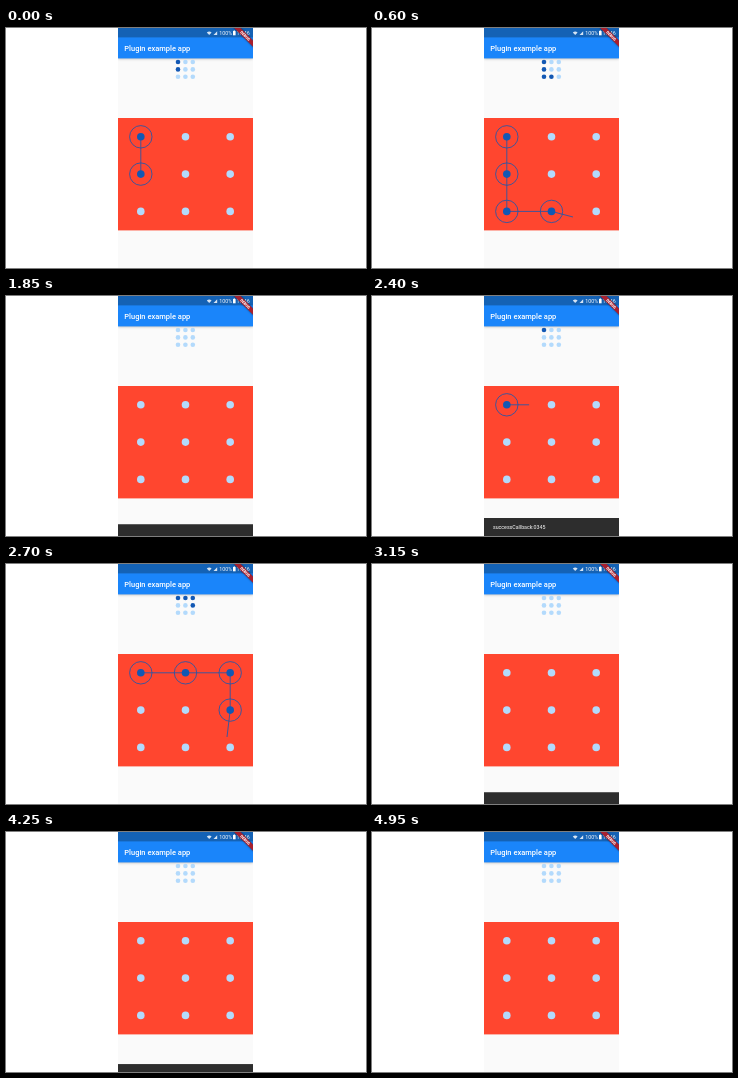
An HTML page with a canvas for the animation above (5000 ms loop, 360x240 px).

```html
<!DOCTYPE html>
<html lang="en">
<head>
<meta charset="utf-8">
<title>Pattern lock</title>
<style>
html, body { margin: 0; width: 100%; height: 100%; overflow: hidden; background: #fff; }
canvas { display: block; width: 360px; height: 240px; }
</style>
</head>
<body>
<canvas id="stage" width="360" height="240"></canvas>
<script>
const ctx = document.getElementById('stage').getContext('2d');
const LOOP = 5000, STEP = 50;
const LEFT = 112, WIDTH = 135, RIGHT = LEFT + WIDTH;
const BAR_HEIGHT = 18, BAR_TIME = 107;
const IDLE = '#b3dafc', ACTIVE = '#1258b4';

const nodeAt = i => [134.8 + (i % 3) * 44.7, 108.8 + Math.floor(i / 3) * 37.3];
const miniAt = i => [172 + (i % 3) * 7.4, 34 + Math.floor(i / 3) * 7.4];

// Keys are [time, node] or [time, x, y]; the finger glides between them.
// Lifting it clears the pattern and shows a snack bar until `hide`.
const strokes = [
  { lift: 655, hide: 1261,
    keys: [[-150, 0], [0, 3], [240, 6], [470, 7], [600, 201, 189], [650, 8]] },
  { lift: 1805, hide: 2405,
    keys: [[1550, 0], [1630, 3], [1710, 4], [1790, 5]] },
  { lift: 3105, hide: 3711,
    keys: [[2350, 0], [2450, 1], [2540, 2], [2630, 5], [2700, 221, 173],
           [2750, 8], [2870, 7], [3000, 6]] },
  { lift: 4215, hide: 4840,
    keys: [[3760, 0], [3830, 3], [3885, 4], [3900, 187, 147], [4010, 5], [4140, 8]] }
];

const isNode = k => k.length === 2;
const keyPoint = k => isNode(k) ? nodeAt(k[1]) : [k[1], k[2]];
const clamp = v => Math.max(0, Math.min(1, v));

// cubic-bezier(.4, 0, .2, 1)
function ease(x) {
  let lo = 0, hi = 1;
  for (let i = 0; i < 20; i++) {
    const s = (lo + hi) / 2;
    const bx = 1.2 * s * (1 - s) ** 2 + 0.6 * s * s * (1 - s) + s ** 3;
    if (bx < x) lo = s; else hi = s;
  }
  return lo * lo * (3 - 2 * lo);
}

function rect(x, y, w, h, fill) {
  ctx.fillStyle = fill;
  ctx.fillRect(x, y, w, h);
}

function dot([x, y], r, fill) {
  ctx.fillStyle = fill;
  ctx.beginPath();
  ctx.arc(x, y, r, 0, Math.PI * 2);
  ctx.fill();
}

function label(text, x, y, font, align = 'left') {
  ctx.font = font + ' Roboto, sans-serif';
  ctx.textAlign = align;
  ctx.fillStyle = '#fff';
  ctx.fillText(text, x, y);
}

function gesture(t) {
  const stroke = strokes.find(s => t >= s.keys[0][0] && t < s.lift);
  if (!stroke) return { picked: [], finger: null };
  const { keys } = stroke;
  const past = keys.filter(k => k[0] <= t);
  const a = past[past.length - 1], b = keys[past.length] || a;
  const p = keyPoint(a), q = keyPoint(b);
  const u = a === b ? 0 : (t - a[0]) / (b[0] - a[0]);
  return {
    picked: past.filter(isNode).map(k => k[1]),
    finger: [p[0] + (q[0] - p[0]) * u, p[1] + (q[1] - p[1]) * u]
  };
}

function drawStatus() {
  rect(LEFT, 0, WIDTH, 9.4, '#1462b5');
  ctx.fillStyle = '#d5e4f4';
  ctx.beginPath();
  ctx.moveTo(203.2, 7);
  ctx.arc(203.2, 7, 3.4, -Math.PI * 0.75, -Math.PI * 0.25);
  ctx.fill();
  ctx.beginPath();
  ctx.moveTo(207.5, 7);
  ctx.lineTo(211.2, 7);
  ctx.lineTo(211.2, 3.3);
  ctx.fill();
  label('100%', 213.2, 7.2, '5.3px');
  rect(227, 3, 2.6, 4.3, '#fff');
  rect(227.7, 2.4, 1.2, 0.7, '#fff');
  label('16:46', 230.5, 7.2, '5.3px');
}

function drawAppBar() {
  ctx.save();
  ctx.shadowColor = 'rgba(0,0,0,.35)';
  ctx.shadowBlur = 3;
  ctx.shadowOffsetY = 1;
  rect(LEFT, 9, WIDTH, 21.4, '#1a85fa');
  ctx.restore();
  drawStatus();
  label('Plugin example app', 118.3, 23, '500 7.5px');
}

function drawBanner() {
  ctx.save();
  ctx.translate(RIGHT, 0);
  ctx.rotate(Math.PI / 4);
  ctx.shadowColor = 'rgba(0,0,0,.5)';
  ctx.shadowBlur = 2;
  rect(-15, 8.8, 30, 4.5, '#a8202f');
  ctx.shadowColor = 'transparent';
  label('DEBUG', 0, 12.4, '900 3.8px', 'center');
  ctx.restore();
}

function drawLock({ picked, finger }) {
  rect(LEFT, 90, WIDTH, 112.4, '#ff462f');
  ctx.strokeStyle = ACTIVE;
  ctx.lineWidth = 0.8;
  for (let i = 0; i < 9; i++) {
    const on = picked.includes(i), p = nodeAt(i);
    dot(p, 3.8, on ? ACTIVE : IDLE);
    dot(miniAt(i), 2.3, on ? ACTIVE : IDLE);
    if (!on) continue;
    ctx.beginPath();
    ctx.arc(p[0], p[1], 11.2, 0, Math.PI * 2);
    ctx.stroke();
  }
  if (!finger) return;
  ctx.beginPath();
  picked.forEach(i => ctx.lineTo(...nodeAt(i)));
  ctx.lineTo(...finger);
  ctx.stroke();
}

function drawSnackBar(t) {
  const stroke = strokes.find(s => t >= s.lift && t < s.hide + BAR_TIME);
  if (!stroke) return;
  const shown = Math.min(clamp((t - stroke.lift) / BAR_TIME),
                         clamp(1 - (t - stroke.hide) / BAR_TIME));
  const h = BAR_HEIGHT * ease(shown);
  rect(LEFT, 240 - h, WIDTH, h, '#2d2d2d');
  const code = stroke.keys.filter(isNode).map(k => k[1]).join('');
  ctx.globalAlpha = clamp((shown - 0.6) / 0.4);
  label('successCallback:' + code, 121, 251 - h, '5.25px');
  ctx.globalAlpha = 1;
}

function draw(t) {
  rect(0, 0, 360, 240, '#fff');
  ctx.save();
  ctx.beginPath();
  ctx.rect(LEFT, 0, WIDTH, 240);
  ctx.clip();
  rect(LEFT, 0, WIDTH, 240, '#fafafa');
  drawAppBar();
  drawLock(gesture(t));
  drawSnackBar(t);
  drawBanner();
  ctx.restore();
}

const start = performance.now();
function tick() {
  const t = (performance.now() - start) % LOOP;
  draw(Math.floor(t / STEP) * STEP);
  requestAnimationFrame(tick);
}
tick();
</script>
</body>
</html>
```
